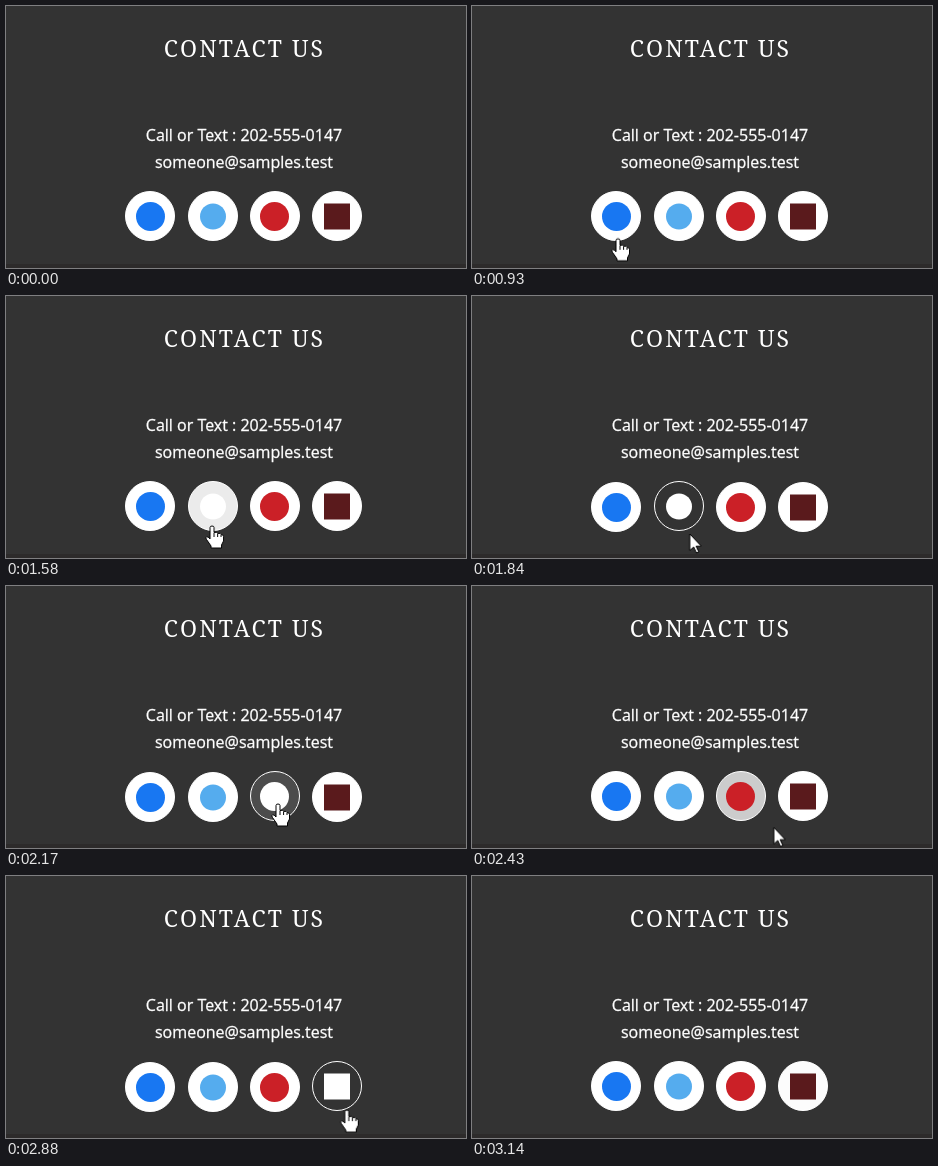
An HTML page that plays this animation: 460 px wide and 262 px high, repeating every 3200 ms.

```html
<!DOCTYPE html>
<html lang="en">
<head>
<meta charset="utf-8">
<title>Contact us</title>
<style>
  html, body { margin: 0; width: 100%; height: 100%; overflow: hidden; background: #333; }
  svg { display: block; width: 460px; height: 262px; }
  text { fill: #fff; stroke: #fff; stroke-width: .3px; text-anchor: middle; font: 16px "Open Sans", sans-serif; }
  .title { font: 23px "Noto Serif", serif; letter-spacing: 2.1px; stroke: none; }

  .row { animation: drop 3.2s step-end infinite; }
  .icon { animation: lift 3.2s var(--at) step-end infinite; }
  .disc { fill: #fff; stroke: #fff; animation: fade 3.2s var(--at) infinite; }
  .mark { animation: whiten 3.2s var(--at) step-end infinite; }
  .pointer { visibility: hidden; animation: move 3.2s linear infinite; }
  .pointer path { fill: #fff; stroke: #000; stroke-linejoin: round; }
  .hand { animation: hand 3.2s step-end infinite; }
  .arrow { animation: arrow 3.2s step-end infinite; }

  /* a hovered icon pushes its neighbours down by a pixel */
  @keyframes drop {
    0%, 38.6%, 57.8%, 71.7%, 90.2%, 100% { transform: none; }
    31.1%, 50.3%, 64.2%, 82.7% { transform: translateY(1px); }
  }
  @keyframes lift {
    0%, 9.375%, 100% { transform: none; }
    1.9% { transform: translateY(-1px); }
  }
  /* 300 ms in, 300 ms out, starting when the pointer enters */
  @keyframes fade {
    0% { fill-opacity: 1; animation-timing-function: ease; }
    9.375% { fill-opacity: 0; animation-timing-function: ease; }
    18.75%, 100% { fill-opacity: 1; }
  }
  @keyframes whiten {
    0% { fill: #fff; }
    9.375%, 100% { fill: var(--color); }
  }
  @keyframes move {
    0% { visibility: hidden; transform: translate(146px, 233px); animation-timing-function: step-end; }
    29.06% { visibility: visible; transform: translate(146px, 233px); animation-timing-function: ease-out; }
    35.3% { transform: translate(142px, 207px); animation-timing-function: ease-in; }
    38.6% { transform: translate(158px, 229px); }
    45.3% { transform: translate(187px, 237px); }
    48.4% { transform: translate(202px, 235px); }
    49.4% { transform: translate(206px, 230px); animation-timing-function: ease-out; }
    53.1% { transform: translate(213px, 223px); animation-timing-function: ease-in; }
    57.5% { transform: translate(217.5px, 238px); }
    62% { transform: translate(257px, 233px); animation-timing-function: ease-out; }
    67.8% { transform: translate(272px, 218px); animation-timing-function: ease-in; }
    71.7% { transform: translate(281px, 233px); }
    75% { transform: translate(297px, 243px); }
    80.8% { transform: translate(326px, 234px); }
    81.9% { transform: translate(332px, 226px); animation-timing-function: ease-out; }
    86% { transform: translate(338px, 221px); animation-timing-function: ease-in; }
    90.2% { transform: translate(341px, 235px); }
    94% { visibility: visible; transform: translate(344px, 263px); animation-timing-function: step-end; }
    94.01%, 100% { visibility: hidden; transform: translate(344px, 263px); }
  }
  @keyframes hand {
    0%, 48.4%, 62%, 80.8% { opacity: 1; }
    38.6%, 57.2%, 71.7%, 90.2%, 100% { opacity: 0; }
  }
  @keyframes arrow {
    0%, 48.4%, 62%, 80.8% { opacity: 0; }
    38.6%, 57.2%, 71.7%, 90.2%, 100% { opacity: 1; }
  }
</style>
</head>
<body>
<svg viewBox="0 0 460 262">
  <rect y="258" width="460" height="4" fill="#2d2b2b"/>
  <text class="title" x="238.5" y="51">CONTACT US</text>
  <text x="238" y="135">Call or Text : 202-555-0147</text>
  <text x="238" y="162">someone@samples.test</text>

  <g class="row">
    <g class="icon" style="--at: 935ms; --color: #1877f2">
      <circle class="disc" cx="144" cy="210" r="24.5"/>
      <circle class="mark" cx="144.5" cy="210.5" r="14.5" fill="#1877f2"/>
    </g>
    <g class="icon" style="--at: 1550ms; --color: #55acee">
      <circle class="disc" cx="207" cy="210" r="24.5"/>
      <circle class="mark" cx="207" cy="210.5" r="13" fill="#55acee"/>
    </g>
    <g class="icon" style="--at: 1995ms; --color: #cb2027">
      <circle class="disc" cx="269" cy="210" r="24.5"/>
      <circle class="mark" cx="268.5" cy="210.5" r="14.5" fill="#cb2027"/>
    </g>
    <g class="icon" style="--at: 2585ms; --color: #5a1a1c">
      <circle class="disc" cx="331" cy="210" r="24.5"/>
      <rect class="mark" x="318" y="197.5" width="26" height="26" fill="#5a1a1c"/>
    </g>
  </g>

  <g class="pointer">
    <g class="hand">
      <path d="M-2 1.5Q-2 0 0 0T2 1.5V6.5Q5 5.6 5.6 7.4 8.5 6.8 9 8.6 11.5 8.4 11.5 10.5V15L9.5 19V22H-1V20L-5.5 13.5Q-7 11.5-5.5 10.8-4 10.3-2 13Z"/>
      <path d="M2 7V11M5.6 8V11M9 9V11"/>
    </g>
    <path class="arrow" d="M0 0V16.5L3.8 13L6.6 19L9 18L6.3 12.2H11.5Z"/>
  </g>
</svg>
</body>
</html>
```
